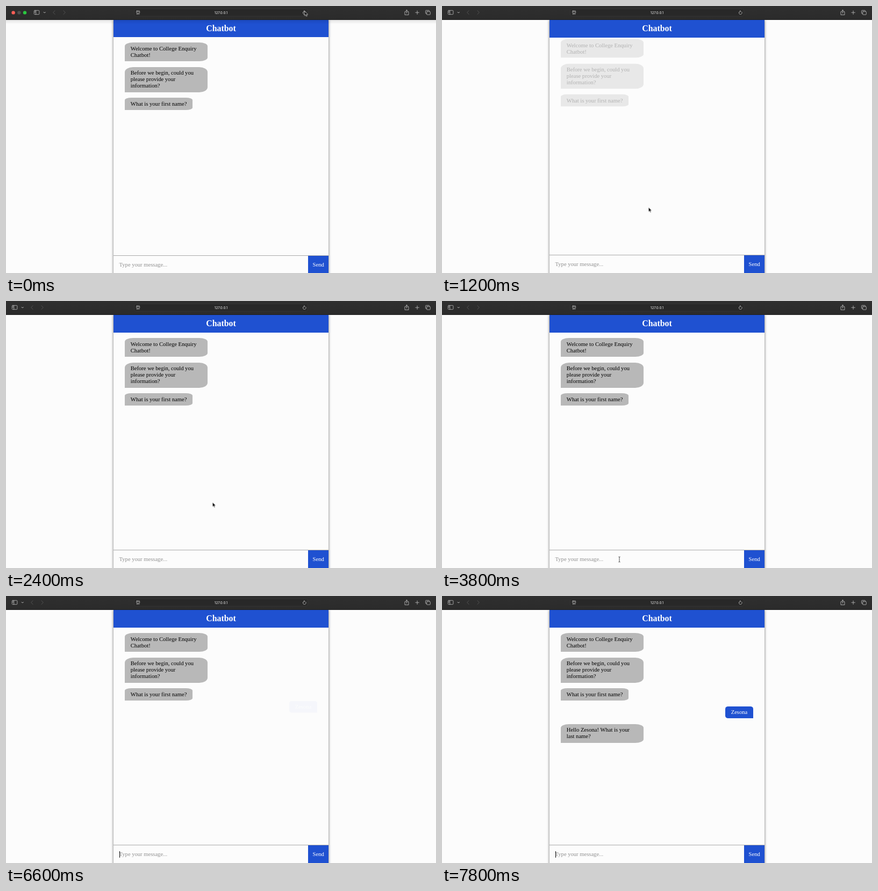
Animation, 800 px wide and 498 px high, one loop 8 s. Source, as an HTML page:

```html
<!DOCTYPE html>
<html lang="en">
<head>
<meta charset="utf-8">
<title>Chatbot</title>
<style>
:root { --blue: #1f51d1; --paper: #fcfcfc; --u: 10.58px; }
html, body { margin: 0; width: 100%; height: 100%; overflow: hidden; background: var(--paper); }
#stage {
  position: relative; width: 800px; height: 498px; overflow: hidden; background: var(--paper);
  font: 10.58px/12.17px "Liberation Serif", "Times New Roman", serif; color: #000; white-space: nowrap;
}
#stage div, #stage svg { position: absolute; box-sizing: border-box; }

/* every animation is one loop long and is set by the clock below */
.anim { animation: 8s linear infinite both paused; }

.chat { left: 200px; top: 26px; width: 400px; height: 480px; background: var(--paper); box-shadow: 0 0 4.5px rgba(0,0,0,.6); }
.head {
  left: 0; top: 0; width: 400px; height: 34px; background: var(--blue); color: #fff;
  font-weight: bold; font-size: 15.87px; line-height: 32.7px; text-align: center;
}
.log {
  left: 0; top: 32.7px; width: 400px; height: 410px; background: var(--paper);
  padding: var(--u) 21.2px; display: flex; flex-direction: column; align-items: flex-start; gap: var(--u);
  --d: -1px; animation-name: nudge; animation-timing-function: step-end;
}
#stage .msg { position: static; padding: 5.29px var(--u); background: #b8b8b8; border-radius: 10% / 20%; border-bottom-left-radius: 0; }
#stage .wide { width: 153.5px; }
#stage .user { align-self: flex-end; background: var(--blue); color: #fff; border-radius: 10% / 20%; border-bottom-right-radius: 0; }
.greet { animation-name: greet; }
.user { animation-name: answer; }
.reply { animation-name: reply; }

.entry {
  left: 0; top: 438.2px; width: 400px; height: 36px; border-top: 1px solid #a9a9a9; background: var(--paper);
  line-height: 33.4px; --d: 1px; animation-name: nudge; animation-timing-function: step-end;
}
.entry div { top: 0; left: var(--u); height: 33px; }
.entry #hint { color: #919191; }
.entry .send { left: 362.3px; width: 37.7px; background: var(--blue); color: #fff; text-align: center; height: 36px; }
.caret {
  display: inline-block; width: 1px; height: 12px; background: #000; vertical-align: -2.5px;
  animation-name: blink; animation-timing-function: step-end;
}

.bar { left: 0; top: 0; width: 800px; height: 26px; background: linear-gradient(#2f2f2f, #2b2b2b); border-bottom: 1px solid #1f1f1f; }
.shade { left: 0; top: 26px; width: 800px; height: 8px; background: linear-gradient(rgba(0,0,0,.09), transparent); animation-name: vanish; }
.lights { animation-name: vanish; }
.nav { animation-name: slide; }
.mouse { left: 0; top: 0; overflow: visible; animation-name: travel; }
.arrow { animation-name: arrow; animation-timing-function: step-end; }
.beam { animation-name: beam; animation-timing-function: step-end; }

@keyframes nudge { 0% { transform: translateY(var(--d)); } 5%, 100% { transform: none; } }
@keyframes vanish { 0%, 1.9% { opacity: 1; } 6%, 100% { opacity: 0; } }
@keyframes slide {
  0%, 1.9% { transform: translateX(41px); animation-timing-function: ease; }
  6.25%, 100% { transform: none; }
}
@keyframes greet {
  0%, 4.99% { opacity: 1; transform: none; }
  5%, 13.75% { opacity: 0; transform: translateY(-10.58px); animation-timing-function: ease; }
  20%, 100% { opacity: 1; transform: none; }
}
@keyframes answer {
  0%, 82.19% { opacity: 0; transform: translateY(-10.58px); animation-timing-function: ease; }
  88.44%, 100% { opacity: 1; transform: none; }
}
@keyframes reply {
  0%, 91.25% { opacity: 0; transform: translateY(-10.58px); animation-timing-function: ease; }
  97.5%, 100% { opacity: 1; transform: none; }
}
@keyframes blink {
  0% { opacity: 0; } 42.5% { opacity: 1; } 47.5% { opacity: 0; } 52.5% { opacity: 1; }
  72.5% { opacity: 0; } 77.5%, 100% { opacity: 1; }
}
@keyframes travel {
  0% { transform: translate(555.5px, 9.5px); }
  2.5% { transform: translate(551px, 18px); animation-timing-function: ease-in-out; }
  7.5% { transform: translate(453px, 269px); animation-timing-function: ease-out; }
  14%, 30% { transform: translate(384.3px, 375.5px); animation-timing-function: ease-in-out; }
  41%, 100% { transform: translate(330px, 482px); }
}
@keyframes arrow { 0% { opacity: 1; } 40%, 100% { opacity: 0; } }
@keyframes beam { 0% { opacity: 0; } 40% { opacity: 1; } 52.5%, 100% { opacity: 0; } }
</style>
</head>
<body>
<div id="stage">
  <div class="chat">
    <div class="head">Chatbot</div>
    <div class="log anim">
      <div class="msg wide greet anim">Welcome to College Enquiry<br>Chatbot!</div>
      <div class="msg wide greet anim">Before we begin, could you<br>please provide your<br>information?</div>
      <div class="msg greet anim">What is your first name?</div>
      <div class="msg user anim">Zesona</div>
      <div class="msg wide reply anim">Hello Zesona! What is your<br>last name?</div>
    </div>
    <div class="entry anim">
      <div id="hint">Type your message...</div>
      <div><span id="typed"></span><i class="caret anim"></i></div>
      <div class="send">Send</div>
    </div>
  </div>

  <div class="shade anim"></div>
  <div class="bar"></div>
  <svg width="800" height="26" fill="none" stroke="#c4c4c4" stroke-width=".8" stroke-linecap="round" stroke-linejoin="round" style="left:0;top:0">
    <g class="lights anim" stroke="none">
      <circle cx="13.6" cy="12.4" r="3.2" fill="#fe5f57"/>
      <circle cx="24.4" cy="12.4" r="3.2" fill="#505050"/>
      <circle cx="35" cy="12.4" r="3.2" fill="#2ac840"/>
    </g>
    <g class="nav anim">
      <rect x="11.3" y="8.3" width="9.6" height="7.4" rx="1.2"/>
      <path d="M14.6 8.3v7.4M12.6 10.2h.7M12.6 11.8h.7"/>
      <path d="M29.1 11.4l1.6 1.6 1.6-1.6" stroke-width="1"/>
      <path d="M50.2 8.6l-3.6 3.5 3.6 3.5M65.8 8.6l3.6 3.5-3.6 3.5" stroke="#5c5c5c"/>
    </g>
    <rect x="238.5" y="5.5" width="323" height="13.5" rx="3" fill="#282828" stroke="#3a3a3a" stroke-width=".7"/>
    <rect x="242.8" y="9" width="5.8" height="4.6" rx=".8"/>
    <path d="M244.2 10.7h3M243 15.2h3.4M247.6 15.2h.6"/>
    <text x="400" y="14.8" text-anchor="middle" fill="#f2f2f2" stroke="none" font-family="Inter, Roboto, sans-serif" font-size="6.4">127.0.0.1</text>
    <path d="M557.6 10.9a2.9 2.9 0 1 1-2.2-1.1M554.4 8.3l1.5 1.5-1.5 1.4"/>
    <path d="M744 10.6h-2v5.9h7v-5.9h-2M745.5 13.4V7.4M743.7 9l1.8-1.7 1.8 1.7"/>
    <path d="M761.8 12.2h6.6M765.1 8.9v6.6"/>
    <path d="M782.6 14.3h-1a1 1 0 0 1-1-1V9.2a1 1 0 0 1 1-1h4.8a1 1 0 0 1 1 1v.9"/>
    <rect x="782.7" y="10.2" width="6.6" height="6" rx="1"/>
  </svg>

  <svg class="mouse anim" width="1" height="1">
    <path class="arrow anim" d="M0 0v8.4l1.9-1.7 1.3 3 1.4-.6-1.3-2.9h2.6z" fill="#000" stroke="#fff" stroke-width=".7" stroke-linejoin="round"/>
    <path class="beam anim" d="M-1.6-5Q0-5 0-3.8Q0-5 1.6-5M0-3.8V3.8M-1.6 5Q0 5 0 3.8Q0 5 1.6 5" fill="none" stroke="#222" stroke-width=".8"/>
  </svg>
</div>
<script>
const LOOP = 8000, STEP = 200, LEAD = 30;
const NAME = 'Zesona', TYPE_AT = 4400, SEND_AT = 6575;
const typed = document.getElementById('typed');
const hint = document.getElementById('hint');
const anims = document.getAnimations();
const start = performance.now();

function typedAt(t) {
  if (t < TYPE_AT || t >= SEND_AT) return '';
  return NAME.slice(0, 1 + Math.floor((t - TYPE_AT) / STEP));
}

function draw() {
  const now = performance.now() - start + LEAD;
  const t = Math.floor((now % LOOP) / STEP) * STEP;
  for (const a of anims) a.currentTime = t;
  typed.textContent = typedAt(t);
  hint.style.visibility = typed.textContent ? 'hidden' : 'visible';
  requestAnimationFrame(draw);
}
draw();
</script>
</body>
</html>
```
